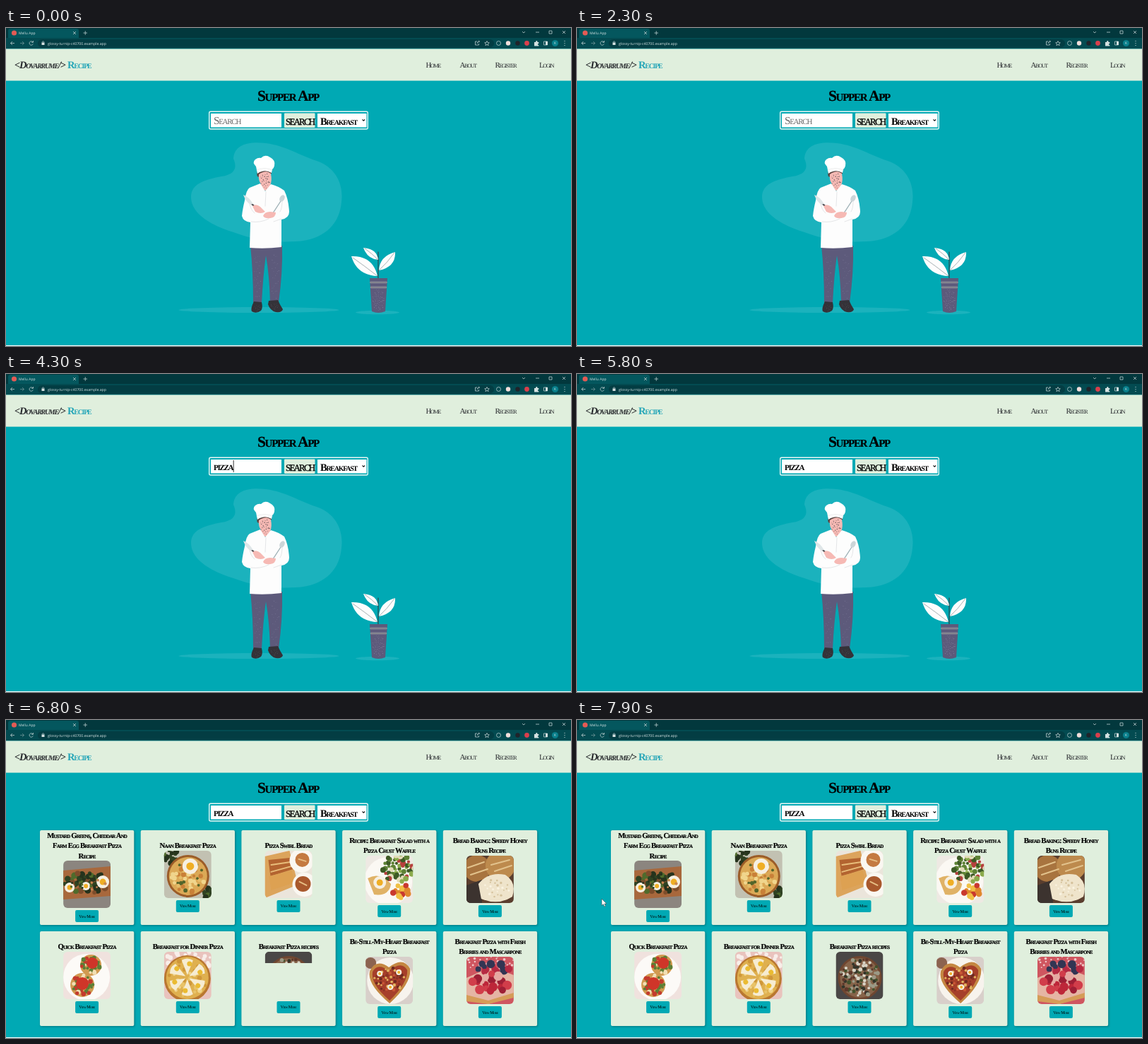
Recreate the animation shown at these times as an HTML page. Size 800 by 450 pixels, loop 8 s.

```html
<!DOCTYPE html>
<html lang="en">
<head>
<meta charset="utf-8">
<title>Recipe search</title>
<style>
html, body { margin: 0; width: 100%; height: 100%; overflow: hidden; background: #00a9b4; }
svg { display: block; }
text { white-space: pre; text-rendering: geometricPrecision; }
.serif { font-family: "Liberation Serif", serif; font-variant: small-caps; letter-spacing: -.08em; }
.ui { font-family: "Open Sans", sans-serif; fill: #d5e2e2; }
.bold { font-weight: bold; }
.heavy { font-weight: bold; stroke: #000; stroke-width: .2; }
.mid { text-anchor: middle; }
.card { fill: #e0efdd; filter: drop-shadow(1px 1.5px 1.5px rgba(0, 40, 45, .4)); }
.line { fill: none; stroke: #b9cccd; stroke-width: .8; }
</style>
</head>
<body>
<svg width="800" height="450" viewBox="0 0 800 450">
  <defs><clipPath id="round"><rect width="67" height="67" rx="6"/></clipPath></defs>
  <rect width="800" height="450" fill="#00a9b4"/>
  <rect y="449" width="800" height="1" fill="#fff"/>

  <!-- browser bar -->
  <rect width="800" height="14" fill="#02383d"/>
  <path d="M3 14V4Q3 1 6 1H100Q103 1 103 4V14Z" fill="#04575e"/>
  <rect y="14" width="800" height="15.5" fill="#034b51"/>
  <rect x="45" y="16" width="646" height="11.5" rx="5.7" fill="#033d43"/>
  <g class="ui">
    <circle cx="11.5" cy="7" r="3.6" fill="#e25b55"/>
    <text x="18" y="9" font-size="5">Mellu App</text>
    <text x="59" y="24" font-size="5.2">glossy-turnip-c40700.example.app</text>
    <rect x="50.5" y="20.5" width="4" height="3.5"/>
    <path class="line" d="M95 5l4 4m0-4l-4 4M109.500 7h5.500m-2.750-2.750v5.500M12 21.500H6.500l2.500-2.500m-2.500 2.500l2.500 2.500M51.300 20.500v-1q1.200-1.500 2.400 0v1"/>
    <path class="line" style="stroke:#6d9497" d="M20 21.500h5.500l-2.500-2.500m2.500 2.500l-2.500 2.500"/>
    <path class="line" d="M38 20a2.700 2.700 0 1 0 .3 2.500M38.500 18v2.300h-2.300"/>
    <path class="line" d="M731 5l2 2 2-2M750 6h5M769 4h4v4h-4zM788 4l4 4m0-4l-4 4"/>
    <path class="line" d="M667 19h-2.500v5h5v-2M667 22q0-3 3.500-3m-1.500-1.500l1.500 1.500-1.500 1.500"/>
    <path class="line" d="M681 18.500l1 2.200 2.300.2-1.800 1.500.6 2.300-2.100-1.300-2.100 1.300.6-2.300-1.800-1.500 2.300-.2z"/>
    <circle cx="697.5" cy="21.5" r="3" class="line"/>
    <circle cx="711" cy="21.5" r="3.2" fill="#f2dedb"/>
    <circle cx="724.5" cy="21.5" r="3.2" fill="#20232a"/>
    <circle cx="737.5" cy="21.5" r="3.4" fill="#d93f4c"/>
    <path d="M748 20h2q0-2 1.300-2t1.300 2h1.700v2q-1.500 0-1.500 1t1.500 1v1.500h-6.300z"/>
    <path class="line" d="M761.500 19h5v5h-5z"/><path d="M764 19h3v5h-3z"/>
    <circle cx="777.5" cy="21.5" r="4.6" fill="#087f8b"/>
    <text x="777.5" y="23.3" font-size="5" class="mid">K</text>
    <path d="M790.500 18h1v1h-1zm0 3h1v1h-1zm0 3h1v1h-1z"/>
  </g>

  <!-- page header -->
  <rect y="29.5" width="800" height="45.1" fill="#e0efdd"/>
  <g class="serif" fill="#26282c">
    <text x="12" y="57" font-size="14.5" class="bold" font-style="italic">&lt;Dovarrume/&gt;</text>
    <text x="87" y="57" font-size="14.6" class="bold" fill="#26a6b8">Recipe</text>
    <g font-size="10.9">
      <text x="594.5" y="56">Home</text><text x="642.5" y="56">About</text>
      <text x="692.5" y="56">Register</text><text x="755" y="56">Login</text>
    </g>
    <text x="399.5" y="103" font-size="21.4" class="heavy mid" fill="#000">Supper App</text>
  </g>

  <!-- search form -->
  <rect x="287.7" y="118.2" width="224.6" height="24.8" rx="2" fill="none" stroke="#e8f6f4" stroke-width="1.4"/>
  <path d="M290 121h100v19.500h-100zM441 121h69.500v19.500h-69.500z" fill="#fff"/>
  <rect x="394" y="120.5" width="43.5" height="20.5" rx="1" fill="#e0efdd"/>
  <g class="serif">
    <text id="query" x="294" y="136" font-size="15.2"></text>
    <text x="396" y="136.5" font-size="13" stroke="#000" stroke-width=".3" style="letter-spacing:-.14em">SEARCH</text>
    <text x="445" y="137" font-size="14.5" class="bold">Breakfast</text>
  </g>
  <path d="M504.500 129.500l1.800 1.800 1.800-1.800" fill="none" stroke="#111" stroke-width="1.1"/>
  <rect id="caret" y="122" width=".8" height="17"/>

  <g id="hero"></g>
  <g id="cards"></g>
  <path id="cursor" d="M0 0V9.500L2.200 7.500 3.800 11 5.400 10.300 3.900 7H6.800Z" fill="#fff" stroke="#333" stroke-width=".5"/>
</svg>
<script>
const $ = id => document.getElementById(id);
const shape = (d, fill) => `<path d="${d}" fill="${fill}"/>`;
const stroke = (d, color, w) => `<path d="${d}" fill="none" stroke="${color}" stroke-width="${w}" stroke-linecap="round"/>`;
const oval = (x, y, rx, ry, fill) => `<ellipse cx="${x}" cy="${y}" rx="${rx}" ry="${ry}" fill="${fill}"/>`;
const disc = (x, y, r, fill) => oval(x, y, r, r, fill);
const egg = (x, y, r) => disc(x, y, r, '#f6efe2') + disc(x, y, r * .5, '#efae25');

// Even scatter of small discs: golden-angle spiral with seeded jitter
function dots(n, x, y, rx, ry, size, colors, seed = 1) {
  const rnd = () => (seed = (seed * 16807 + 12345) % 2147483647) / 2147483647;
  for (let i = 0; i < 4; i++) rnd();
  let out = '';
  for (let i = 0; i < n; i++) {
    const a = i * 2.4 + rnd() * .5, d = Math.sqrt((i + rnd()) / n);
    const color = colors[Math.floor(rnd() * colors.length)];
    out += disc(x + rx * d * Math.cos(a), y + ry * d * Math.sin(a), size * (.6 + rnd() * .6), color);
  }
  return out;
}

const GLOW = '#1bb2bd', PLUM = '#5d5a7b', DARK = '#343238', SKIN = '#f6b9b4';
const leg = (x, seed) => dots(28, x, 350, 5.5, 36, .4, ['#8a88a5'], seed);

$('hero').innerHTML =
  shape('M322 185C323 165 343 160 368 163C397 167 415 180 440 188C468 198 478 222 475 246C472 284 442 301 410 302C372 304 350 299 322 289C290 279 262 263 262 239C262 219 285 214 305 210C326 207 327 196 322 185Z', GLOW) +
  oval(358, 399, 113.5, 4, GLOW) + oval(526, 402.5, 31, 2.7, GLOW) +
  // legs and shoes
  shape('M346 308H391Q392 345 386 389H374Q373 350 368 322Q364 350 362 389H350Q350 345 346 308Z', PLUM) + leg(356, 7) + leg(381, 19) +
  shape('M351 387L362 388Q364 396 361 400Q354 405 348 401Q346 397 351 387ZM372 386L385 385Q388 392 392 398Q391 403 382 402Q374 400 371 391Z', DARK) +
  dots(14, 355, 396, 5, 5, .35, ['#77757b'], 5) + dots(14, 380, 394, 6, 5, .35, ['#77757b'], 9) +
  // head
  shape('M356 203Q354 210 358 211L376 206V201Z', '#5a4340') +
  shape('M358 207Q368 200 375 206Q377 216 374 223L373 231L361 229V221Q357 215 358 207Z', SKIN) +
  dots(26, 367, 216, 7, 11, .55, [DARK], 23) +
  shape('M356 206L354 196Q348 190 353 186Q357 183 361 184Q367 178 374 183Q382 187 380 195Q379 199 377 200L376 205Q366 199 356 206Z', '#fff') +
  stroke('M355 201Q366 196 377 201', '#d8dada', .5) +
  // jacket
  shape('M360 220L345 226Q340 229 338 244Q335 256 334 266Q336 274 346 275L345 311Q367 313 390 310V271Q401 269 401 260Q400 242 394 230Q386 224 375 221L367 231Z', '#fdfdfd') +
  stroke('M345 246Q345 256 352 262M391 244Q391 256 388 260M347 274Q360 276 372 270M368 232L367 252M390 270L379 274', '#d4d5d8', .6) +
  // tools and hands
  stroke('M345 247L353 253', DARK, 2) + shape('M336 236Q344 239 350 249L346 250Q339 245 336 236Z', '#dfe6e8') +
  stroke('M374 268L389 245', '#9db0b5', 1.3) + `<g transform="rotate(30 391 241)">${oval(391, 241, 3.3, 5, '#ccd5d8')}</g>` +
  shape('M349 252Q354 248 360 253L367 260Q361 264 353 260ZM364 266Q366 260 374 260L382 261Q382 268 374 269Q367 270 364 266Z', SKIN) +
  // plant
  stroke('M527 317V355M527 328Q516 325 509 314M528 343Q540 334 549 319M526 351Q510 342 492 326', DARK, 1) +
  shape('M489 323Q519 322 526 351Q497 350 489 323ZM551 317Q552 338 528 343Q529 323 551 317ZM506 311Q525 312 527 328Q512 327 506 311Z', '#fdfdfd') +
  stroke('M491 325Q508 337 526 351M550 318Q540 332 528 343M508 312Q518 319 526 327', '#6f7f84', .6) +
  shape('M515 354H540L537 401Q527 405 518 401Z', PLUM) +
  stroke('M516.5 360H538.5M517 367H538', '#a7a9b4', 2.6) + stroke('M516 360H539M516.5 367H538.5', DARK, .6) +
  dots(55, 527.5, 385, 9, 15, .4, ['#a3a1b8'], 31);

const bg = fill => shape('M0 0H67V67H0Z', fill);
const GREENS = ['#2f4222', '#4f6b2c', '#26331d'];
const TOPPING = ['#5c7e35', '#f1dfb4', '#c33b2d'];
const wedge = i => `<g transform="rotate(${i * 60} 33 36)">${shape('M33 33L25 12Q33 7 41 12Z', '#f6ecd2') + disc(36, 17, 3.5, '#eabb32')}</g>`;
const photos = [
  bg('#8b857f') + shape('M0 14L67 8V50L0 55Z', '#a8683c') + dots(46, 33, 31, 32, 15, 4, [...GREENS, '#7d4d2b'], 3) + egg(32, 36, 6) + egg(56, 30, 9) + egg(9, 38, 7) + dots(16, 34, 31, 28, 12, 2, ['#c98750', ...GREENS], 4),
  bg('#c2c1b2') + dots(12, 8, 8, 14, 10, 4, GREENS, 5) + dots(9, 61, 58, 8, 10, 4, GREENS, 6) + disc(34, 36, 30, '#9b5c28') + disc(34, 36, 27, '#dba956') + dots(46, 34, 38, 24, 22, 3, ['#f0d58c', '#c98038', '#53652a', '#e4bd69'], 8) + egg(37, 22, 11),
  bg('#ebe5db') + shape('M0 8L35 0L47 48L0 67Z', '#dca45c') + shape('M5 13L36 10L40 26L8 36Z', '#b36430') + shape('M6 36L38 28L42 45L9 56Z', '#dda152') + stroke('M9 20L36 16M9 30L38 22', '#e8bd7a', 2) + disc(52, 14, 17, '#faf7f1') + disc(53, 13, 10, '#c47a41') + disc(56, 48, 17, '#faf7f1') + disc(54, 47, 11, '#a9592d') + stroke('M48 12L58 15M49 44L59 49', '#e6bd83', 2),
  bg('#eee9e3') + disc(32, 36, 34, '#fbf8f3') + dots(50, 46, 18, 23, 20, 3.5, ['#5e8235', '#8bab4d', '#3d5a25', '#b6403d', '#e3dcb9'], 11) + shape('M3 32Q20 22 36 40Q33 58 12 55Z', '#e0b266') + egg(20, 38, 9) + dots(12, 50, 50, 13, 10, 4, ['#e0882e', '#c9392e', '#f0c045'], 6),
  bg('#5a3e2e') + disc(15, 18, 19, '#a8743f') + disc(48, 14, 21, '#bd8a4d') + stroke('M2 17L25 9M35 13L61 6M6 27L30 19M40 22L64 14', '#e2c28c', 2) + shape('M0 42L22 34V67H0Z', '#3c332f') + shape('M17 40Q31 22 55 27Q72 38 65 58Q45 71 21 61Z', '#efe4cb') + dots(22, 42, 46, 19, 13, 1.5, ['#d5c29c', '#faf3e1'], 12),
  bg('#f0e2de') + disc(33, 36, 33, '#fcfaf7') + disc(39, 19, 15, '#d19a50') + disc(27, 47, 17, '#d19a50') + dots(26, 39, 19, 14, 12, 3, TOPPING, 13) + dots(30, 27, 47, 16, 14, 3, TOPPING, 14) + disc(41, 16, 8, '#cf3529') + disc(27, 45, 9, '#cf3529'),
  bg('#e9c3bd') + dots(30, 34, 12, 34, 16, 3, ['#f8eee9'], 15) + disc(33, 38, 33, '#b97730') + disc(33, 37, 30, '#dfb04f') + dots(36, 33, 37, 28, 27, 3, ['#e8c368', '#cf973a', '#f0d48a'], 22) + [0, 1, 2, 3, 4, 5].map(wedge).join(''),
  bg('#4a4746') + disc(34, 37, 31, '#6f4630') + disc(34, 37, 28, '#86644a') + dots(95, 34, 36, 28, 27, 2.6, ['#d8d4c6', '#42522c', '#5d382b', '#9b9a86', '#33352a'], 16),
  bg('#d8cfca') + disc(35, 34, 33, '#f7f3ed') + disc(7, 9, 8, '#8c6350') + shape('M34 66Q1 38 6 20Q15 2 33 15Q53 -1 63 17Q65 38 34 66Z', '#c48742') + shape('M34 62Q6 38 10 21Q17 8 33 20Q51 5 59 19Q60 37 34 62Z', '#a63f2a') + dots(54, 34, 32, 22, 17, 2, ['#6d2a20', '#c85635', '#e2b45f', '#8c3325'], 17) + egg(20, 24, 4) + egg(47, 22, 4) + egg(35, 43, 4),
  bg('#cf5660') + dots(40, 34, 9, 34, 14, 1.6, ['#f0c7c8'], 18) + shape('M0 30L36 14L67 26V56L31 67L0 58Z', '#e5b5a4') + shape('M0 54L31 62L67 51V58L31 67L0 63Z', '#d59c58') + dots(14, 36, 17, 24, 9, 5, ['#323553', '#b62a43'], 20) + dots(18, 35, 37, 27, 14, 6, ['#bd2639', '#d13d4a', '#9d1f35', '#e6a9a2'], 21)
];

const titles = [
  'Mustard Greens, Cheddar And|Farm Egg Breakfast Pizza|Recipe', 'Naan Breakfast Pizza', 'Pizza Swirl Bread',
  'Recipe: Breakfast Salad with a|Pizza Crust Waffle', 'Bread Baking: Speedy Honey|Buns Recipe', 'Quick Breakfast Pizza',
  'Breakfast for Dinner Pizza', 'Breakfast Pizza recipes', 'Be-Still-My-Heart Breakfast|Pizza', 'Breakfast Pizza with Fresh|Berries and Mascarpone'
];

$('cards').innerHTML = titles.map((title, i) => {
  const x = 48 + i % 5 * 142.7, y = i < 5 ? 156 : 299, mid = x + 66.6;
  const lines = title.split('|'), top = y + 21.8 + 7.1 * lines.length;
  const heading = lines.map((s, k) =>
    `<text x="${mid}" y="${top - 3.6 - 14.3 * (lines.length - 1 - k)}" font-size="10.7" class="serif heavy mid">${s}</text>`).join('');
  return `<rect class="card" x="${x}" y="${y}" width="133.3" height="134" rx="2"/>${heading}
    <svg class="photo" x="${mid - 33.5}" y="${top}" width="67" height="0"><g clip-path="url(#round)">${photos[i]}</g></svg>
    <rect x="${mid - 16.5}" y="${top + 70}" width="33" height="17" rx="2" fill="#00a9b4"/>
    <text x="${mid}" y="${top + 80.5}" font-size="6.1" class="serif mid">View More</text>`;
}).join('');

const LOOP = 8000, STEP = 100, TYPE_START = 2900, TYPE_GAP = 250, RESULTS = 6200, LOAD = 280;
const word = 'pizza', typed = TYPE_START + TYPE_GAP * (word.length - 1);
const loadStart = [6300, 6450, 6420, 6480, 6450, 6420, 6285, 6733, 6450, 6358];
const photoBoxes = document.querySelectorAll('.photo');
const clamp = v => Math.max(0, Math.min(1, v));
const show = (id, on) => $(id).setAttribute('visibility', on ? 'visible' : 'hidden');

function draw(now) {
  const t = Math.floor(now % LOOP / STEP) * STEP;
  const count = Math.max(0, Math.min(word.length, Math.floor((t - TYPE_START) / TYPE_GAP) + 1));
  const query = $('query');
  query.textContent = count ? word.slice(0, count) : 'Search';
  query.setAttribute('fill', count ? '#000' : '#6b6b6b');
  query.setAttribute('font-weight', count ? 'bold' : 'normal');
  $('caret').setAttribute('x', 294.5 + (count ? query.getComputedTextLength() : 0));
  show('caret', count && (t < typed || (t - typed) % 1060 < 530));

  show('hero', t < RESULTS);
  show('cards', t >= RESULTS);
  photoBoxes.forEach((box, i) => box.setAttribute('height', 67 * clamp((t - loadStart[i]) / LOAD)));

  const p = 1 - (1 - clamp((t - 7500) / 400)) ** 2;
  show('cursor', t >= 7600);
  $('cursor').setAttribute('transform', `translate(${290 - 255 * p} ${150 + 103 * p})`);
  requestAnimationFrame(() => draw(performance.now()));
}
draw(0);
</script>
</body>
</html>
```
